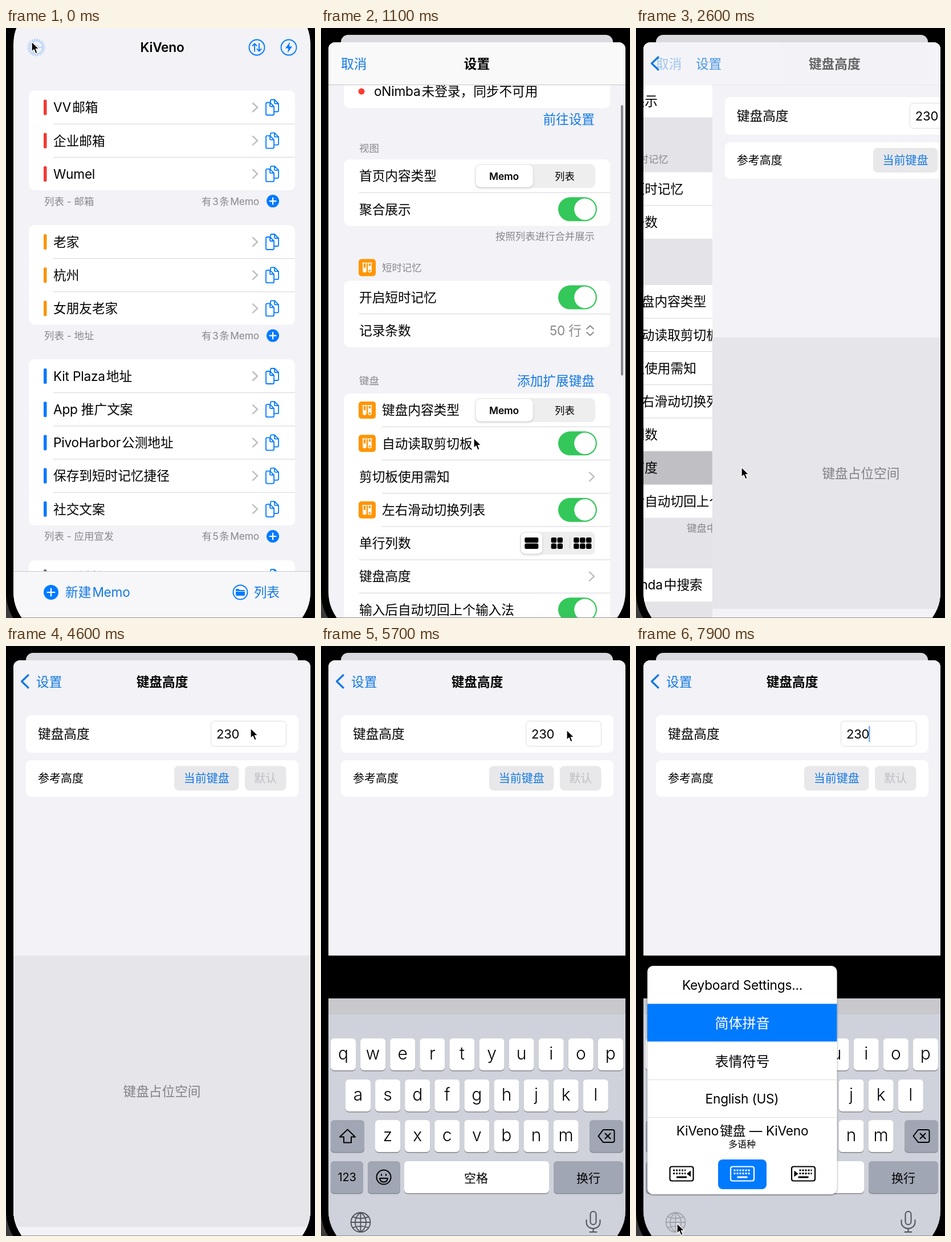
These frames come from a looping animation (542 by 1033 pixels, 8 s). An HTML page:

```html
<!DOCTYPE html>
<html lang="zh-CN">
<head>
<meta charset="utf-8">
<title>键盘高度</title>
<style>
html, body { margin: 0; width: 100%; height: 100%; overflow: hidden; background: #000; }
svg { display: block; width: 542px; height: 1033px; }
text { font-family: Inter, "Noto Sans CJK SC", "Noto Sans CJK", sans-serif; white-space: pre; }
.latin { letter-spacing: -.01em; }
.line { fill: none; stroke: currentColor; stroke-width: 2; stroke-linecap: round; stroke-linejoin: round; }
</style>
</head>
<body>
<svg id="stage" viewBox="0 0 542 1033"></svg>
<script>
const BLUE = '#007aff', LINK = '#1479e0', GREY = '#87878c', PAPER = '#f2f2f7', BODY = 22.67, NOTE = 17.4;

// drawing helpers
const text = (x, y, s, { size = BODY, fill = '#000', anchor = 'start', weight = 400 } = {}) =>
  `<text x="${x}" y="${y + size * .37}" font-size="${size}" fill="${fill}" text-anchor="${anchor}" font-weight="${weight}">${
    s.replace(/[\u4e00-\u9fff](?=[A-Za-z0-9])|[A-Za-z0-9](?=[\u4e00-\u9fff])/g, '$&\u200a')
      .replace(/[A-Za-z0-9][\w .()]*/g, m => `<tspan class="latin">${m}</tspan>`)}</text>`;
const note = (x, y, s, anchor) => text(x, y, s, { size: NOTE, fill: GREY, anchor });
const box = (x, y, w, h, fill, r = 0, more = '') =>
  `<rect x="${x}" y="${y}" width="${w}" height="${h}" rx="${r}" fill="${fill}" ${more}/>`;
const disc = (x, y, r, fill) => `<circle cx="${x}" cy="${y}" r="${r}" fill="${fill}"/>`;
const icon = (x, y, color, d, width = 2, more = '') =>
  `<g transform="translate(${x} ${y})" color="${color}"><path class="line" style="stroke-width:${width}" d="${d}"/>${more}</g>`;
const ring = r => `M${-r} 0a${r} ${r} 0 1 1 ${2 * r} 0a${r} ${r} 0 1 1 ${-2 * r} 0`;
const group = (id, inner) => `<g id="${id}">${inner}</g>`;
const rule = (x, y, to = 507) => box(x, y - .5, to - x, 1, '#d4d4d8');
const chevron = (x, y) => icon(x, y, '#bdbdc2', 'M-4-7.5L4 0-4 7.5', 2.4);
const plus = (x, y, r) => disc(x, y, r, BLUE) + icon(x, y, '#fff', `M${-r * .5} 0H${r * .5}M0 ${-r * .5}V${r * .5}`, 2.2);
const globe = (x, y, r, color, w) => icon(x, y, color,
  `${ring(r)}H${r}M0 ${-r}V${r}M0 ${-r}C${-r * .75} ${-r * .5} ${-r * .75} ${r * .5} 0 ${r}C${r * .75} ${r * .5} ${r * .75} ${-r * .5} 0 ${-r}` +
  `M${-r * .8} ${-r * .55}Q0 ${-r * .25} ${r * .8} ${-r * .55}M${-r * .8} ${r * .55}Q0 ${r * .25} ${r * .8} ${r * .55}`, w);
const copyIcon = (x, y) => icon(x, y, BLUE,
  'M-3-9.5V-11.5q0-2 2-2H4L11-6.5V5.5q0 2-2 2H4M4-13v5q0 1.5 1.5 1.5H11' +
  'M-11-6.5q0-2 2-2h5L3-1.5V11.5q0 2-2 2H-9q-2 0-2-2ZM-4-8v5q0 1.5 1.5 1.5H3', 1.8);

// home list
function homeSection(top, color, names, label) {
  const h = names.length * 58.2;
  let out = box(40, top, 467, h, '#fff', 10);
  names.forEach((name, i) => {
    const y = top + 29.5 + i * 58.2;
    out += box(66, y - 13.5, 5.5, 27, color, 2) + text(83, y, name) + chevron(437, y) + copyIcon(467, y);
    if (i) out += rule(83, y - 29.1);
  });
  const foot = top + h + 19;
  return out + (label ? note(67, foot, '列表 - ' + label) +
    note(444, foot, `有${names.length}条Memo`, 'end') + plus(468, foot, 11) : '');
}
const home =
  box(13, -48, 521, 1111, PAPER, 75, 'id="homeBack"') +
  group('gear', icon(53, 34, BLUE, ring(11.5) + ring(4) + 'M4 0H11M-2-3.5L-6-10M-2 3.5L-6 10', 1.8,
    '<circle r="14" fill="none" stroke="currentColor" stroke-width="3" stroke-dasharray="2.4 2"/>')) +
  text(274, 34, 'KiVeno', { anchor: 'middle', weight: 600 }) +
  icon(440, 34, BLUE, ring(13.5) + 'M-4 6.5V-6.5M-7.5-3L-4-6.5-.5-3M4-6.5V6.5M.5 3L4 6.5 7.5 3', 1.9) +
  icon(496, 34, BLUE, ring(13.5), 1.9, '<path d="M2-9.5L-6 1.5H-.8L-2 9.5 6-1.8H.8Z" fill="currentColor"/>') +
  homeSection(109.5, '#f03a34', ['VV邮箱', '企业邮箱', 'Wumel'], '邮箱') +
  homeSection(345, '#f99508', ['老家', '杭州', '女朋友老家'], '地址') +
  homeSection(580, BLUE, ['Kit Plaza地址', 'App 推广文案', 'PivoHarbor公测地址', '保存到短时记忆捷径', '社交文案'], '应用宣发') +
  homeSection(932, '#6c6c70', ['公测链接', '下载链接'], '') +
  box(13, 951, 521, 120, '#f7f7fa') + box(13, 951, 521, 1, '#c9c9cd') +
  plus(79, 988, 13) + text(104, 988, '新建Memo', { fill: LINK }) +
  icon(411, 988, BLUE, ring(12.5), 1.9,
    '<path d="M-8-4q0-2 2-2h3l2 2h7q2 0 2 2H-8zM-8-1H8V4q0 2-2 2H-6q-2 0-2-2z" fill="currentColor"/>') +
  text(480, 988, '列表', { fill: LINK, anchor: 'end' }) +
  box(13, -48, 521, 1111, '#000', 75, 'id="homeShade"');

// settings list
const toggle = (y, on = true) => box(416, y - 21, 68, 42, on ? '#34c759' : '#e5e5e8', 21) +
  disc(on ? 463 : 437, y, 18.8, '#fff');
const badge = y => box(66, y - 15, 30, 30, '#ff9500', 5) + [-4.5, 4.5].map(dx => icon(81 + dx, y, '#fff',
  'M-3.5-8H3.5M-2.5-8V5.5a2.5 2.5 0 0 0 5 0V-8', 1.6,
  `<path d="M-1.5 ${dx < 0 ? 0 : -3}h3v7h-3z" fill="currentColor"/>`)).join('');
const segment = y => box(270, y - 21, 211, 42, '#eeeeef', 9) +
  box(271.5, y - 19.5, 100, 39, '#fff', 8, 'filter="url(#soft)"') +
  text(321, y, 'Memo', { size: 17.4, anchor: 'middle', weight: 600 }) +
  text(427.5, y, '列表', { size: NOTE, anchor: 'middle', weight: 500 });
const blocks = (x, y, cols, w) => {
  let out = '';
  for (let i = 0; i < cols * 2; i++)
    out += box(x + (i % cols - cols / 2) * (w + 1.4), y - 10 + (i < cols ? 0 : 10.7), w, 9.3, '#000', 2.5);
  return out;
};
const columns = y => box(349, y - 20, 132, 40, '#eeeeef', 9) + box(351, y - 18.5, 37, 37, '#fff', 8, 'filter="url(#soft)"') +
  box(436, y - 10, 1, 20, '#d5d5d9') + blocks(370, y, 1, 24) + blocks(414.5, y, 2, 9.5) + blocks(459.5, y, 3, 9.5);
const stepper = y => text(457, y, '50 行', { fill: GREY, anchor: 'end' }) +
  icon(472, y, GREY, 'M-6-3L0-8.5 6-3M-6 3L0 8.5 6 3', 1.9);

function card(top, rows) {
  let out = box(40, top, 467, rows.length * 58.2, '#fff', 10);
  rows.forEach(([name, control, marked, id], i) => {
    const y = top + 29.1 + i * 58.2;
    if (id) out += box(40, y - 29.1, 467, 58.2, '#bfbfc4', 0, `id="${id}"`);
    if (i) out += rule(marked || rows[i - 1][2] ? 107 : 67, y - 29.1);
    out += (marked ? badge(y) : '') + text(marked ? 107 : 67, y, name) + control(y);
  });
  return out;
}
const arrow = y => chevron(475, y);
const settings =
  card(146, [['', y => disc(71, y, 5.5, '#ff3b30') + text(93, y, 'oNimba未登录，同步不可用')]]) +
  text(480, 224, '前往设置', { fill: LINK, anchor: 'end' }) +
  note(67, 275, '视图') +
  card(294, [['首页内容类型', segment], ['聚合展示', toggle]]) +
  note(480, 428.5, '按照列表进行合并展示', 'end') +
  badge(483.5) + note(107, 483.5, '短时记忆') +
  card(506.5, [['开启短时记忆', toggle], ['记录条数', stepper]]) +
  note(67, 682, '键盘') + text(480, 682, '添加扩展键盘', { fill: LINK, anchor: 'end' }) +
  card(704, [['键盘内容类型', segment, 1], ['自动读取剪切板', toggle, 1], ['剪切板使用需知', arrow],
    ['左右滑动切换列表', toggle, 1], ['单行列数', columns], ['键盘高度', arrow, 0, 'pressed'], ['输入后自动切回上个输入法', toggle]]) +
  note(209, 1130, '键盘中图标为:') + globe(341, 1130, 8, GREY, 1.2) + disc(333, 1135, 4.5, GREY) +
  icon(333, 1135, PAPER, 'M1-2L-1.5 0 1 2', 1.2) + note(362, 1130, '- 会') +
  globe(412, 1130, 8, GREY, 1.2) + note(480, 1130, '- 不会', 'end') +
  note(67, 1181, '扩展') +
  card(1200, [['Glimfinda中搜索', y => toggle(y, false)]]);

// keyboard height page
const button = (x, w, s, fill) => box(x, 210, w, 43, '#e8e8eb', 8) + text(x + w / 2, 232, s, { size: 20, fill, anchor: 'middle' });
const heightPage = box(13, 25, 521, 1040, PAPER) +
  box(35, 121, 478, 66, '#fff', 9) + text(56, 154, '键盘高度') +
  box(359.5, 131.5, 132, 44, '#fff', 6, 'stroke="#dcdce0"') + text(369, 154, '230', { size: 22 }) +
  box(408, 140, 2.6, 28, '#3f8cec', 1, 'id="caret"') +
  box(35, 200, 478, 64, '#fff', 9) + text(56, 232, '参考高度', { size: 20 }) +
  button(295, 113.5, '当前键盘', LINK) + button(419, 72.5, '默认', '#bfbfc4') +
  box(13, 542, 521, 475, '#e5e5ea') + text(273.5, 780, '键盘占位空间', { fill: '#808085', anchor: 'middle' });

const nav = box(13, 25, 521, 74, PAPER) +
  group('navTint', box(13, 25, 521, 74, '#f9f9fa') + box(13, 99, 521, 1, '#c6c6ca')) +
  group('cancel', text(35, 63, '取消', { fill: LINK })) +
  group('title', text(273.5, 63, '设置', { anchor: 'middle', weight: 600 })) +
  group('chevron', icon(33, 62, LINK, 'M6-11L-5.5 0 6 11', 3.2)) +
  group('back', text(53, 63, '设置', { fill: LINK })) +
  group('newTitle', text(274, 63, '键盘高度', { anchor: 'middle', weight: 600 }));

// keyboard
const DARK = '#a0a6b3';
const key = (x, y, w, fill = '#fff') => box(x, y + 1.5, w, 56, '#86888e', 6) + box(x, y, w, 56, fill, 6);
const letters = (x, y, s) => [...s].map((c, i) => key(x + i * 52.1, y, 44) +
  `<text x="${x + 22 + i * 52.1}" y="${y + 37}" font-size="30" font-weight="300" text-anchor="middle">${c}</text>`).join('');
const mid = (x, y, s, size) => text(x, y, s, { size, anchor: 'middle' });
const keyboard = box(13, 617, 521, 450, '#cfd2da') + box(13, 617, 521, 28, '#c8c8cd') +
  letters(17, 687, 'qwertyuiop') + letters(43, 759, 'asdfghjkl') + letters(95, 830, 'zxcvbnm') +
  key(17, 830, 59, DARK) + icon(46.5, 858.5, '#000', 'M0-12L13.5 1H6.5V11H-6.5V1H-13.5Z') +
  key(471, 830, 59, DARK) + icon(500.5, 858, '#000', 'M-14 0L-5.5-11H11q3 0 3 3V8q0 3-3 3H-5.5ZM-2-4.5L7 4.5M7-4.5L-2 4.5') +
  key(17, 902, 57, DARK) + mid(45.5, 930, '123', 20) +
  key(82, 902, 57, DARK) + icon(110, 930, '#000', ring(12.5) + 'M-7 2H7Q6 8.5 0 8.5T-7 2ZM-4-5v2M4-5v2', 2) +
  key(146, 902, 254) + mid(272, 931, '空格', 21) + key(408, 902, 122, DARK) + mid(469, 931, '换行', 21) +
  group('globe', globe(69.5, 1009, 17, '#4f5258', 1.8)) +
  icon(477.5, 1007, '#4f5258', 'M-5-12a5 5 0 0 1 10 0V1a5 5 0 0 1-10 0ZM-12-2V2a12 11 0 0 0 24 0V-2M0 13V19M-6 19H6', 2);

// side: where the small arrow points, 0 for none
function miniKeys(x, color, side) {
  const left = side > 0 ? -7 : -15, run = side ? 22 : 30;
  return icon(x, 924, color,
    'M-17-12.5H17q3.5 0 3.5 3.5V9q0 3.5-3.5 3.5H-17q-3.5 0-3.5-3.5V-9q0-3.5 3.5-3.5Z', 2.2,
    `<path d="M${left}-6h${run}M${left}-.5h${run}" stroke="currentColor" stroke-width="3" stroke-dasharray="3 2"/>` +
    '<path d="M-9 6H9" stroke="currentColor" stroke-width="3"/>' +
    (side ? `<path d="M${side * -16} -5.5V5.5L${side * -9} 0Z" fill="currentColor"/>` : ''));
}
const menu = box(20, 560, 332.5, 400, '#fff', 10, 'filter="url(#drop)"') +
  box(20, 626.5, 332.5, 66, BLUE) + box(20, 759, 332.5, 1, '#dedee2') + box(20, 825, 332.5, 1, '#dedee2') +
  mid(186.5, 594, 'Keyboard Settings...') + text(186.5, 660, '简体拼音', { size: 24, fill: '#fff', anchor: 'middle' }) +
  mid(186.5, 727, '表情符号', 24) + mid(186, 793, 'English (US)') +
  mid(186.5, 849, 'KiVeno键盘 — KiVeno') + mid(186, 872, '多语种', 16) +
  box(144, 899, 85, 52, BLUE, 8) + miniKeys(80, '#000', -1) + miniKeys(186.5, '#fff', 0) + miniKeys(293.5, '#000', 1);

const stage = document.getElementById('stage');
stage.innerHTML = `<defs>
  <clipPath id="screen">${box(13, -48, 521, 1111, '#000', 75)}</clipPath>
  <clipPath id="sheetEdge">${box(13, 25, 521, 1100, '#000', 12)}</clipPath>
  <filter id="soft" x="-20%" y="-20%" width="140%" height="150%"><feDropShadow dx="0" dy="2" stdDeviation="2" flood-opacity=".16"/></filter>
  <filter id="drop" x="-10%" y="-10%" width="120%" height="120%"><feDropShadow dx="0" dy="1" stdDeviation="1.5" flood-opacity=".55"/></filter>
</defs>` +
  box(0, 0, 542, 1033, '#000') + box(0, 985, 13, 48, '#3c3c3e') + box(0, -61, 560, 1137, '#000', 88) +
  `<g clip-path="url(#screen)">` + group('home', home) +
  group('sheet', `<g clip-path="url(#sheetEdge)">` + box(13, 25, 521, 1100, PAPER) +
    box(13, 25, 521, 1100, '#000', 0, 'id="shade"') + group('settings', group('list', settings)) +
    group('heightPage', heightPage) + nav + box(526, 0, 4, 1, '#85858a', 2, 'id="scrollbar"') + '</g>') +
  box(13, 542, 521, 530, '#000', 0, 'id="gap"') + group('keyboard', keyboard) + group('menu', menu) +
  box(13, 1032, 521, 1, '#8e8e93') + '</g>' +
  group('cursor', '<path d="M0 0V17.5L4 13.8 7 20.8 10.2 19.4 7.3 12.6H12.8Z" fill="#000" stroke="#fff" stroke-width="1.3" stroke-linejoin="round"/>');

// motion
const LOOP = 8000, STEP = 100;
const SCROLL = [[800, 0], [900, 8], [1000, 32], [1100, 64], [1300, 142], [1500, 218], [1600, 244], [1700, 254]];
const POINTER = [[200, 45, 24], [700, 262, 785], [900, 263, 776], [1100, 268, 718], [1400, 281, 620], [1700, 289, 544],
  [1800, 285, 556], [2200, 185, 769], [2700, 185, 769], [3100, 290, 520], [3400, 343, 391], [3600, 343, 391],
  [3900, 390, 270], [4200, 442, 152], [4400, 429, 144], [4600, 429, 144], [4800, 431, 147], [5700, 431, 147],
  [5800, 370, 300], [5900, 170, 700], [6000, 68, 903], [6200, 68, 903], [7000, 70, 996], [7100, 70, 996], [7400, 72, 1011]];

const clamp = v => Math.min(1, Math.max(0, v));
function sample(table, t) {
  const i = table.findIndex(k => k[0] > t);
  if (i < 0) return table.at(-1).slice(1);
  if (!i) return table[0].slice(1);
  const [a, b] = [table[i - 1], table[i]], f = (t - a[0]) / (b[0] - a[0]);
  return a.slice(1).map((v, j) => v + (b[j + 1] - v) * f);
}
// share of the way still to go in a critically damped spring
function remaining(t, start) {
  const x = Math.max(0, t - start) * .0178;
  return (1 + x) * Math.exp(-x);
}
const parts = {};
stage.querySelectorAll('[id]').forEach(el => parts[el.id] = el);
const move = (id, x, y = 0) => parts[id].setAttribute('transform', `translate(${x} ${y})`);
const fade = (id, v) => parts[id].setAttribute('opacity', clamp(v));

function draw(t) {
  const rise = remaining(t, 187), push = remaining(t, 2443), keys = remaining(t, 4985);
  const shown = 1 - rise, scale = 1 - .084 * shown;
  parts.home.setAttribute('transform', `translate(${273.5 * (1 - scale)} ${56 * shown}) scale(${scale})`);
  for (const id of ['homeBack', 'homeShade']) parts[id].setAttribute('rx', 75 - 61 * shown);
  fade('homeShade', .1 * shown);
  fade('gear', .25 + Math.max(0, t - 100) / 200);
  move('sheet', 0, 1008 * rise);

  const [scroll] = sample(SCROLL, t);
  move('list', 0, -scroll);
  fade('navTint', Math.min(scroll / 20, push));
  parts.scrollbar.setAttribute('y', 107 + .437 * scroll);
  parts.scrollbar.setAttribute('height', 478 - .069 * scroll);
  fade('scrollbar', t < 900 ? 0 : (2200 - t) / 300);

  fade('pressed', +(t >= 2400));
  move('settings', -156 * (1 - push));
  fade('shade', .08 * (1 - push));
  move('heightPage', 521 * push);
  fade('cancel', push * 1.8 - .05 * (1 - push));
  move('title', -221 * (1 - push));
  fade('title', push * 2 - 1);
  fade('chevron', 1.3 - 1.3 * push);
  move('back', 224 * push);
  fade('back', 1 - push);
  move('newTitle', 320 * push);
  fade('newTitle', 1 - 1.8 * push);

  parts.gap.setAttribute('y', 542 + 491 * keys);
  fade('gap', +(keys < 1));
  move('keyboard', 0, 416 * keys);
  fade('caret', t < 5800 ? 0 : .5 + 1.6 * Math.cos((t - 7670) / 1000 * 2 * Math.PI));
  fade('globe', t < 7200 ? 1 : .35);
  fade('menu', +(t >= 7600));
  move('cursor', ...sample(POINTER, t));
}
const start = performance.now();
function tick() {
  const t = (performance.now() - start) % LOOP;
  draw(Math.floor(t / STEP + .05) * STEP % LOOP);
  requestAnimationFrame(tick);
}
tick();
</script>
</body>
</html>
```
